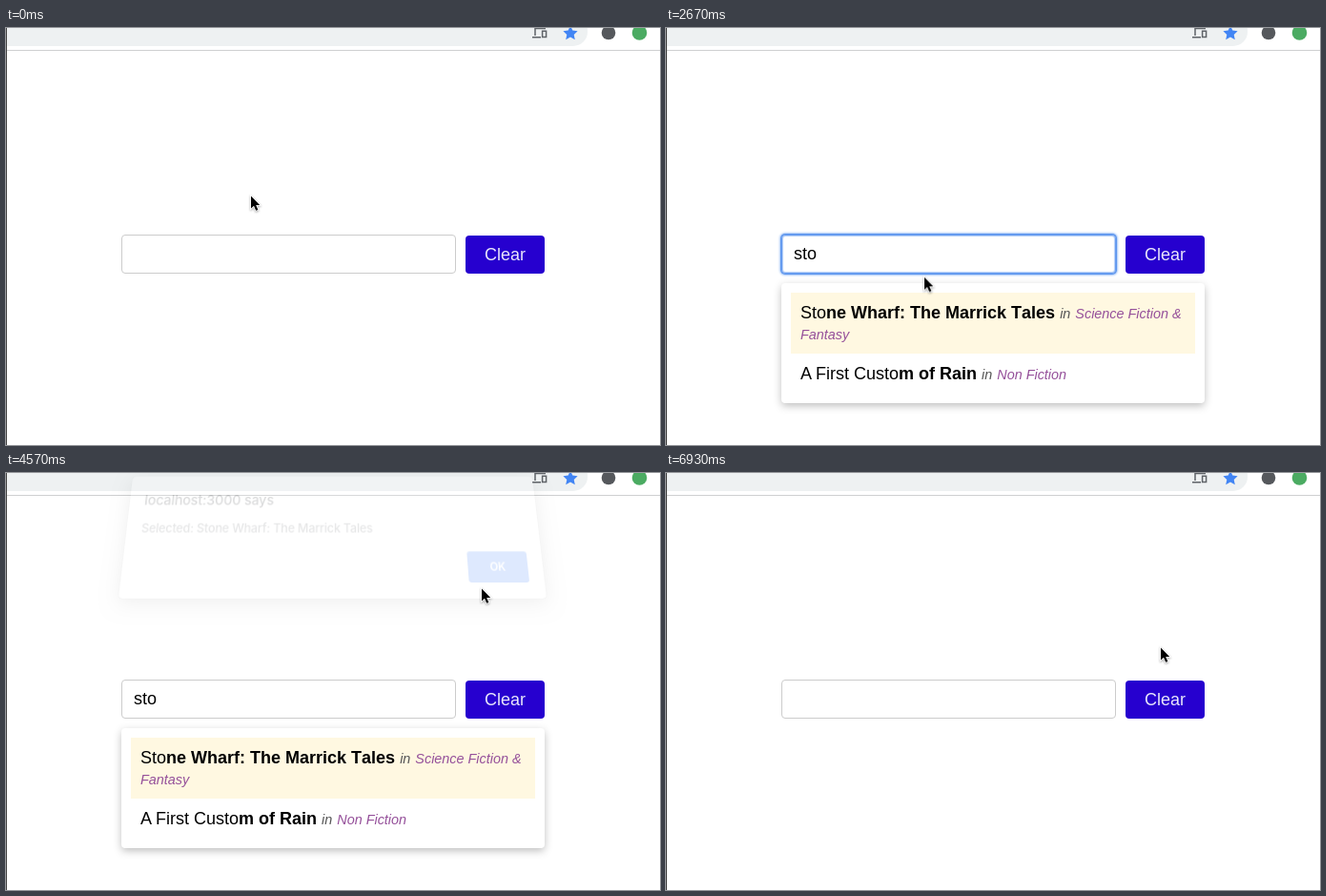
These frames come from a looping animation (686x438 px, 7.07 s). An HTML page:

```html
<!DOCTYPE html>
<html lang="en">
<head>
<meta charset="utf-8">
<title>Autocomplete demo</title>
<style>
  html, body { margin: 0; width: 100%; height: 100%; overflow: hidden; background: #fff; }
  body { position: relative; font: 18px/22px "Liberation Sans", Arial, sans-serif; color: #000; }
  body > *, .alert > * { position: absolute; box-sizing: border-box; }
  svg { display: block; overflow: visible; }

  /* every animation shares one 7.07 s loop */
  .field, .letter, .caret, .clear, .panel, .arrow, .beam { animation: 7.07s step-end infinite; }
  .cursor, .alert { animation: 7.07s linear infinite; }

  /* browser bar */
  .bar { left: 0; top: 0; width: 686px; height: 24px; border-bottom: 1px solid #cfd0d1; }
  .omnibox { left: 0; top: -12px; width: 610px; height: 31px; border-radius: 0 15px 15px 0; background: #eef1f2; }
  .icons { left: 0; top: 0; }
  .edge { left: 0; top: 0; width: 1px; height: 438px; background: #454545; }

  /* form */
  .field { left: 121px; top: 217px; width: 351px; height: 41px; padding-left: 12px; line-height: 39px;
    border: 1px solid #ccc; border-radius: 4px; background: #fff; animation-name: field; }
  .clear { left: 482px; top: 217.5px; width: 83px; height: 40px; border-radius: 4px; background: #2600cf;
    color: #e9e6fb; line-height: 40px; text-align: center; animation-name: clear; }
  .caret { left: 134px; top: 227px; width: 1.4px; height: 21px; background: #000; animation-name: caret; }
  .s { animation-name: s; }
  .t { animation-name: t; }
  .o { animation-name: o; }
  @keyframes field {
    0%, 62.23%, 100% { border-color: #ccc; box-shadow: none; }
    7.49% { border-color: #6a9ef0;
      box-shadow: 0 0 0 1px #5f97ee, 0 0 2px 2px #a9c8f7, inset 0 0 1px 1px #b4cff8; }
  }
  @keyframes clear {
    0%, 98.01%, 100% { box-shadow: none; }
    77.36% { box-shadow: 0 0 0 .8px #d5e3fb, 0 0 0 2.4px #5f98ee, 0 0 2px 2.8px #a9c8f7; }
  }
  @keyframes caret {
    0%, 62.23%, 100% { opacity: 0; transform: none; }
    7.49% { opacity: 1; transform: none; }
    15.98% { opacity: 1; transform: translateX(9px); }
    20.79% { opacity: 1; transform: translateX(14px); }
    25.45% { opacity: 1; transform: translateX(24px); }
    32.53% { opacity: 0; transform: translateX(24px); }
    39.6% { opacity: 1; transform: translateX(24px); }
  }
  @keyframes s { 0%, 78.78%, 100% { opacity: 0; } 15.98% { opacity: 1; } }
  @keyframes t { 0%, 78.78%, 100% { opacity: 0; } 20.79% { opacity: 1; } }
  @keyframes o { 0%, 78.78%, 100% { opacity: 0; } 25.45% { opacity: 1; } }

  /* suggestions */
  .panel { left: 121px; top: 268px; width: 444px; padding: 10px; border-radius: 4px; background: #fff;
    box-shadow: 0 3px 9px rgba(0, 0, 0, .25); }
  .wide { animation-name: wide; }
  .narrow { animation-name: narrow; }
  .row { padding: 10px; }
  .row:first-child { background: #fff8e1; }
  .row b { font-kerning: none; }
  .row i { font-size: 14.4px; line-height: 0; color: #555; }
  .row .genre { color: #95509a; }
  @keyframes wide { 0%, 25.45%, 100% { opacity: 0; } 20.79% { opacity: 1; } }
  @keyframes narrow { 0%, 78.78%, 100% { opacity: 0; } 25.45% { opacity: 1; } }

  /* dialog */
  .alert { left: 118px; top: 20px; width: 449px; height: 130px; border-radius: 4px; background: #fff;
    font-family: Inter, Roboto, sans-serif; font-weight: 500; white-space: nowrap; transform-origin: 50% 100%;
    box-shadow: 0 0 1px rgba(0, 0, 0, .5), 0 4px 20px rgba(0, 0, 0, .36); animation-name: alert; }
  .says { left: 16px; top: 16px; font-size: 15px; letter-spacing: -.1px; color: #2b2e32; }
  .message { left: 16px; top: 46px; font-size: 13px; letter-spacing: -.15px; color: #6a6d71; }
  .ok { left: 369px; top: 82px; width: 64px; height: 32px; border-radius: 3px; background: #3d7ef5;
    color: #fff; font-size: 11.5px; font-weight: 600; line-height: 32px; text-align: center; }
  @keyframes alert {
    0%, 41.44%, 65.16%, 100% { opacity: 0;
      transform: translateY(-22px) perspective(500px) rotateX(17.8deg) scaleY(1.113); }
    41.44% { animation-timing-function: ease-out; }
    44.27%, 62.23% { opacity: 1;
      transform: translateY(0) perspective(500px) rotateX(0deg) scaleY(1); }
    62.23% { animation-timing-function: ease-in-out; }
  }

  /* pointer */
  .cursor { left: 0; top: 0; animation-name: move; }
  .arrow { filter: drop-shadow(0 1px 1px rgba(0, 0, 0, .35)); animation-name: arrow; }
  .beam { animation-name: beam; }
  @keyframes move {
    0% { transform: translate(257px, 176px); }
    .99% { transform: translate(257px, 176px); animation-timing-function: ease-in-out; }
    4.67%, 35.36% { transform: translate(263px, 226px); }
    35.36% { animation-timing-function: cubic-bezier(.4, 0, .8, .8); }
    37.76% { transform: translate(271px, 261px); animation-timing-function: ease-out; }
    40.59%, 50.92% { transform: translate(276px, 290px); }
    50.92% { animation-timing-function: cubic-bezier(.4, 0, .6, .88); }
    57% { transform: translate(470.5px, 130px); animation-timing-function: ease-out; }
    60.82%, 67.47% { transform: translate(499px, 121px); }
    67.47% { animation-timing-function: ease-in-out; }
    76.38%, 88.68% { transform: translate(517px, 231px); }
    88.68% { animation-timing-function: ease-in-out; }
    93.78%, 100% { transform: translate(519px, 183px); }
  }
  @keyframes arrow { 0%, 37.48%, 100% { opacity: 1; } 3.6% { opacity: 0; } }
  @keyframes beam { 0%, 15.98%, 37.48%, 100% { opacity: 0; } 3.6%, 35.36% { opacity: 1; } }
</style>
</head>
<body>
  <div class="bar"></div>
  <div class="omnibox"></div>
  <svg class="icons" width="686" height="24">
    <path d="M555 8V.5H566M552 9.8H561M563 3.2H566.6V9.6H562.6V3.2Z" fill="none" stroke="#5f6368" stroke-width="1.5"/>
    <path fill="#4285f4" d="M592 -2.5L594.3 2.6 599.6 3.2 595.7 6.9 596.8 12.2 592 9.5 587.2 12.2 588.3 6.9 584.4 3.2 589.7 2.6Z"/>
    <circle cx="632" cy="5" r="7.3" fill="#55585c"/>
    <circle cx="664.5" cy="5" r="7.8" fill="#4bab62"/>
  </svg>

  <div class="field"><span class="letter s">s</span><span class="letter t">t</span><span class="letter o">o</span></div>
  <div class="caret"></div>
  <div class="clear">Clear</div>
  <div class="panel wide"></div>
  <div class="panel narrow"></div>

  <div class="alert">
    <div class="says">localhost:3000 says</div>
    <div class="message">Selected: Stone Wharf: The Marrick Tales</div>
    <div class="ok">OK</div>
  </div>
  <div class="edge"></div>

  <svg class="cursor" width="1" height="1">
    <path class="arrow" d="M0 .5V13.6L3 10.8 5.2 15.8 7.4 14.9 5.2 9.9H9.2Z" stroke="#fff" stroke-width="1.6" paint-order="stroke"/>
    <path class="beam" d="M-3 -8Q0 -8 0 -6Q0 -8 3 -8M0 -6V6M-3 8Q0 8 0 6Q0 8 3 8M-1.5 3H1.5" fill="none" stroke="#222" stroke-width="1.1"/>
  </svg>

<script>
  const books = [
    ['Stone Wharf: The Marrick Tales', 'Science Fiction & Fantasy'],
    ['A First Custom of Rain', 'Non Fiction'],
    ['The Dustiest Almanac', 'Non Fiction'],
    ['Upstairs with Herons', 'Fiction']
  ];

  const add = (parent, tag, text, cls = '') => {
    const el = document.createElement(tag);
    el.textContent = text;
    el.className = cls;
    parent.append(el);
    return el;
  };

  // Text after the typed match is set in bold.
  function fill(selector, query) {
    const panel = document.querySelector(selector);
    for (const [title, genre] of books) {
      const at = title.toLowerCase().indexOf(query);
      if (at < 0) continue;
      const end = at + query.length;
      const row = add(panel, 'div', title.slice(0, end), 'row');
      add(row, 'b', title.slice(end));
      row.append(' ');
      add(row, 'i', 'in');
      row.append(' ');
      add(row, 'i', genre, 'genre');
    }
  }

  fill('.wide', 'st');
  fill('.narrow', 'sto');
</script>
</body>
</html>
```
